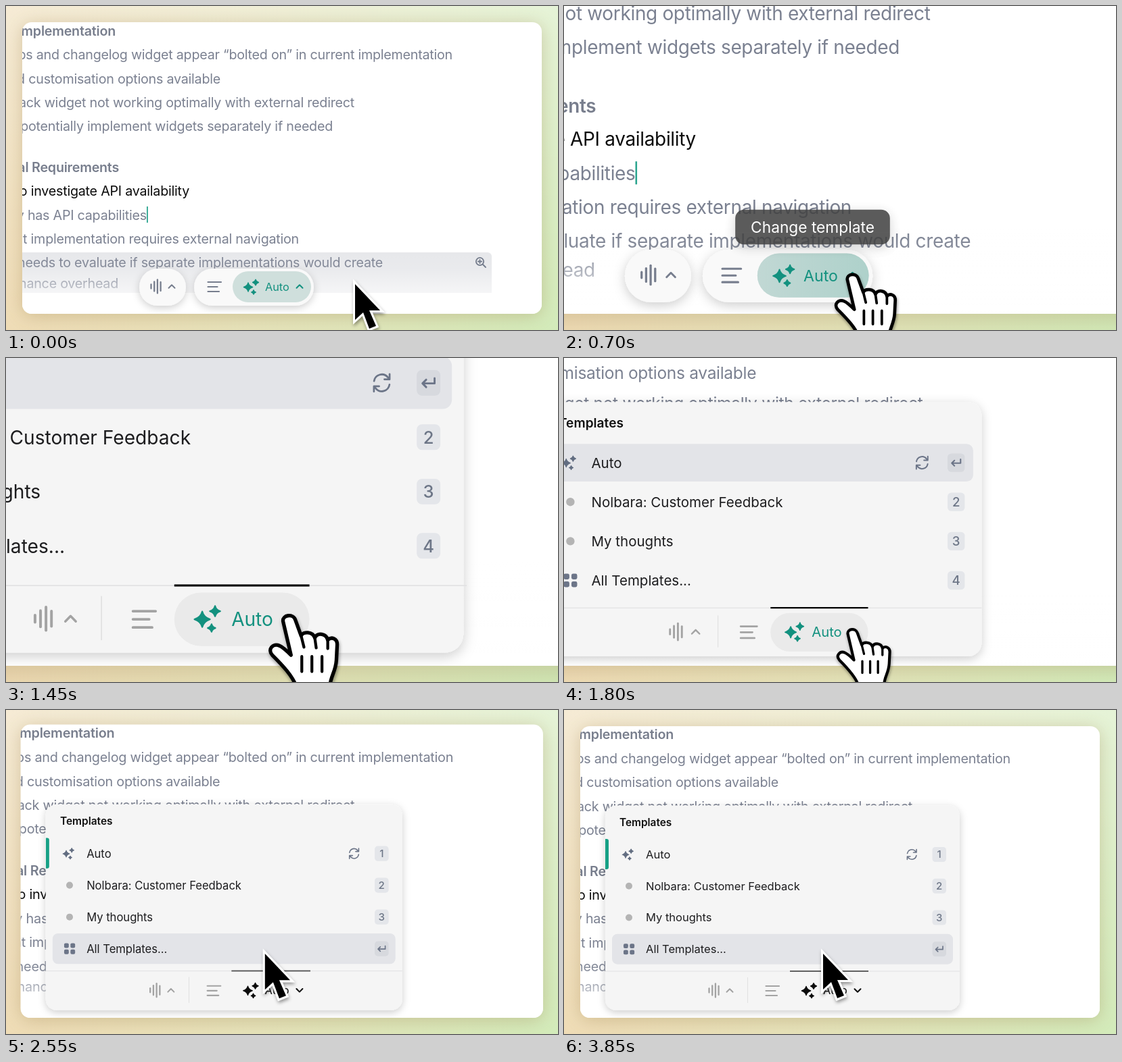
Recreate the animation shown at these times as an HTML page. Size 816 by 480 pixels, loop 3900 ms.

```html
<!DOCTYPE html>
<html lang="en">
<head>
<meta charset="utf-8">
<title>Template picker</title>
<style>
  html, body { margin: 0; width: 100%; height: 100%; overflow: hidden; background: #e9e6c4; }
  svg { display: block; width: 816px; height: 480px; font-family: Inter, "Open Sans", sans-serif; }
  .note { font-size: 19.7px; letter-spacing: -.012em; text-anchor: end; fill: #7b8191; }
  .head { font-weight: 600; fill: #787e8d; }
  .own { fill: #0c0c0c; }
  .item { font-size: 16.5px; fill: #1d1d1f; }
  .label { font-size: 16.3px; }
  .key { font-size: 15px; font-weight: 500; text-anchor: middle; fill: #6d7687; }
  .line { fill: none; stroke-linecap: round; stroke-linejoin: round; }
</style>
</head>
<body>
<svg viewBox="0 0 816 480">
  <defs>
    <linearGradient id="bgAcross">
      <stop offset="0" stop-color="#efdcb6"/><stop offset=".45" stop-color="#e6e3ba"/><stop offset="1" stop-color="#d3ebba"/>
    </linearGradient>
    <linearGradient id="bgDown" x2="0" y2="1">
      <stop offset="0" stop-color="#fff" stop-opacity=".42"/><stop offset="1" stop-color="#fff" stop-opacity="0"/>
    </linearGradient>
    <linearGradient id="fadeDown" x2="0" y2="1">
      <stop offset="0" stop-color="#fff" stop-opacity="0"/><stop offset=".25" stop-color="#fff" stop-opacity=".1"/>
      <stop offset="1" stop-color="#fff"/>
    </linearGradient>
    <linearGradient id="pillHover">
      <stop offset="0" stop-color="#bfd7d3"/><stop offset="1" stop-color="#a9cfc8"/>
    </linearGradient>
    <filter id="soft" x="-20%" y="-20%" width="140%" height="140%"><feGaussianBlur stdDeviation="13"/></filter>
    <filter id="lift" x="-30%" y="-40%" width="160%" height="200%">
      <feDropShadow dx="0" dy="3" stdDeviation="6" flood-color="#000" flood-opacity=".2"/>
    </filter>
    <filter id="tiny" x="-30%" y="-30%" width="170%" height="170%">
      <feDropShadow dx="1" dy="3" stdDeviation="2.5" flood-color="#000" flood-opacity=".4"/>
    </filter>
    <clipPath id="cardClip"><rect x="24" y="24" width="768" height="432" rx="14"/></clipPath>
    <clipPath id="menuClip"><rect class="box" x="61" rx="16"/></clipPath>
  </defs>
  <rect width="816" height="480" fill="url(#bgAcross)"/>
  <rect width="816" height="480" fill="url(#bgDown)"/>
  <g id="camera">
    <rect x="24" y="27" width="768" height="432" rx="14" fill="#8a6a30" opacity=".3" filter="url(#soft)"/>
    <rect x="24" y="24" width="768" height="432" rx="14" fill="#fff"/>
    <g clip-path="url(#cardClip)"><g id="content">
      <g id="rowHover">
        <path d="M0 365H712a6 6 0 0 1 6 6V425H0Z" fill="#e7e8eb"/>
      </g>
      <g id="notes"></g>
      <rect x="24" y="366" width="768" height="90" fill="url(#fadeDown)"/>
      <g id="zoomIcon" class="line" stroke="#737b8b" stroke-width="1.8">
        <circle cx="700.5" cy="378.5" r="5.6"/><path d="M705 383l4 4M697.8 378.5h5.4M700.5 375.8v5.4"/>
      </g>
      <g id="toolbar"></g>
      <g id="tip">
        <rect x="312" y="347.3" width="161" height="36.4" rx="9" fill="#424242" filter="url(#lift)"/>
        <text x="392.5" y="371.8" font-size="16" text-anchor="middle" fill="#fff">Change template</text>
      </g>
      <g id="menu">
        <rect class="box" x="61" rx="16" fill="#f5f5f5" filter="url(#lift)"/>
        <g clip-path="url(#menuClip)"><g id="list"></g></g>
        <g id="footer"></g>
      </g>
    </g></g>
    <g id="cursor"></g>
  </g>
</svg>
<script>
const LOOP = 3900, HOVER = 430, CLICK = 1100, OPEN = 1180, LEAVE = 1950, PICK = 2300;
const TEAL = '#13917f', SLATE = '#6c7588';
const $ = id => document.getElementById(id);

// Small drawing helpers
const line = (d, color, w = 2.2) => `<path class="line" d="${d}" stroke="${color}" stroke-width="${w}"/>`;
const box = (x, y, w, h, r, fill, extra = '') =>
  `<rect x="${x}" y="${y}" width="${w}" height="${h}" rx="${r}" fill="${fill}" ${extra}/>`;
const star = (x, y, r) => {
  const k = r * .26;
  return `M${x} ${y - r}Q${x + k * .7} ${y - k} ${x + r} ${y}Q${x + k * .7} ${y + k} ${x} ${y + r}` +
    `Q${x - k * .7} ${y + k} ${x - r} ${y}Q${x - k * .7} ${y - k} ${x} ${y - r}Z`;
};
const sparkles = (x, y, size, color) =>
  `<path transform="translate(${x} ${y}) scale(${size})" fill="${color}" stroke="${color}" stroke-width="1.4"
    stroke-linejoin="round" d="${star(-4, .5, 6.6)}${star(7, -6.5, 4.4)}${star(4, 8, 3.2)}"/>`;
const chevron = (x, y, dir, color) => line(`M${x - 4.5} ${y + 2.3 * dir}l4.5 ${-4.6 * dir}l4.5 ${4.6 * dir}`, color, 2);
const wave = color => [6, 14, 20, 13].map((h, i) =>
  line(`M${214.5 + i * 4.7} ${415.5 - h / 2}v${h}`, color, 2.3)).join('');
const menuLines = color => line('M298.5 409h19.5M298.5 416h14M298.5 423h16.5', color);

// Notes: text, right end, middle, class
$('notes').innerHTML = [
  ['Current Implementation', 162, 36.5, 'head'],
  ['Roadmaps and changelog widget appear “bolted on” in current implementation', 660, 72],
  ['Limited customisation options available', 317, 107.5],
  ['Feedback widget not working optimally with external redirect', 515, 143],
  ['Could potentially implement widgets separately if needed', 483, 178],
  ['Technical Requirements', 167, 239, 'head'],
  ['Need to investigate API availability', 271, 274, 'own'],
  ['Currently has API capabilities', 208, 309.5],
  ['Current implementation requires external navigation', 433, 345],
  ['Team needs to evaluate if separate implementations would create', 557, 380],
  ['maintenance overhead', 166, 410.5]
].map(([s, x, y, c = '']) => `<text class="note ${c}" x="${x}" y="${y + 7}">${s}</text>`).join('') +
  box(208, 297, 1.8, 24, 0, '#2ba58f');

$('toolbar').innerHTML =
  box(197, 389, 69, 55, 27.5, '#f9f9f9', 'filter="url(#lift)"') +
  box(278, 389, 177, 55, 27.5, '#f9f9f9', 'filter="url(#lift)"') +
  box(335, 393, 116, 46, 23, '#cfdfdc') +
  box(335, 393, 116, 46, 23, 'url(#pillHover)', 'id="pill"') +
  wave('#777e8e') + chevron(245, 415.5, 1, '#777e8e') + menuLines('#777e8e') +
  sparkles(362, 416, 1, TEAL) + `<text class="label" x="383" y="422" fill="${TEAL}">Auto</text>` +
  chevron(434, 415.5, 1, TEAL);

// Menu list
const rowY = [214, 260.7, 307.5, 354.2];
const names = ['Auto', 'Nolbara: Customer Feedback', 'My thoughts', 'All Templates...'];
const enter = y => line(`M560 ${y - 4}v4.5h-10.5m3.2 -3.2l-3.2 3.2l3.2 3.2`, SLATE, 1.7);
const dot = y => `<circle cx="96" cy="${y}" r="5" fill="#b4b4b4"/>`;
const grid = y => [88, 97.3].map(x => [y - 8, y + 1.2].map(v => box(x, v, 6.8, 6.8, 2, SLATE)).join('')).join('');
const icons = [y => sparkles(94, y, .74, '#626d81'), dot, dot, grid];

$('list').innerHTML =
  '<text x="82" y="171.7" font-size="15.4" font-weight="600" fill="#111">Templates</text>' +
  `<path d="M61 191h2a3 3 0 0 1 3 3v39a3 3 0 0 1 -3 3h-2Z" fill="#16a085"/>` +
  rowY.map((y, i) =>
    `<g class="hot">${box(71, y - 22.5, 504, 45, 8, '#e3e4e8')}</g>` + icons[i](y) +
    `<text class="item" x="121" y="${y + 6}">${names[i]}</text>` +
    box(544.5, y - 11, 20.5, 22, 4.5, '#e4e6ea') +
    `<text class="key" x="554.7" y="${y + 5.4}">${i + 1}</text>` +
    `<g class="hot">${box(544.5, y - 11, 20.5, 22, 4.5, '#d7d9de')}${enter(y)}</g>`).join('') +
  line('M507.5 212.5a6.8 6.8 0 0 1 12 -3.2l1.5 1.7m0 -4.5v4.5h-4.5' +
    'M520.9 215.5a6.8 6.8 0 0 1 -12 3.2l-1.5 -1.7m0 4.5v-4.5h4.5', SLATE, 1.6);
const hot = [...document.querySelectorAll('.hot')];

const autoLabel = (id, color, chev) => `<g id="${id}">` + sparkles(362, 415.5, 1, color) +
  `<text class="label" x="383" y="421.5" fill="${color}">Auto</text>` + chev + '</g>';
$('footer').innerHTML =
  box(61, 386.5, 524, 1, 0, '#e2e2e3') + box(271, 396, 1, 38, 0, '#e1e1e1') +
  wave('#a3a3a3') + chevron(245, 415.5, 1, '#a3a3a3') + menuLines('#a3a3a3') +
  box(334, 393, 116, 46, 23, '#eaeaea', 'id="grayPill"') +
  autoLabel('autoOn', TEAL, chevron(434, 415.5, 1, TEAL)) +
  autoLabel('autoOff', '#0c0c0c', chevron(434, 415.5, -1, '#0c0c0c')) +
  box(334, 386, 116, 1.8, 0, '#000', 'id="accent"');

$('cursor').innerHTML =
  `<g id="arrow" filter="url(#tiny)"><path d="M0 0V53L12 42L21 66L31 62L21 39H37Z" fill="#000"
    stroke="#fff" stroke-width="6" paint-order="stroke" stroke-linejoin="miter"/></g>
  <g id="hand" filter="url(#tiny)" transform="scale(.665)"><path d="M-8 8C-9 -1 6 -3 9 6L17 28C20 22 33 22 36 31
    C40 23 52 25 54 34C59 29 68 32 67 42L66 62C65 78 58 84 57 98H10C5 84 -8 70 -23 55C-30 47 -22 38 -13 42
    C-8 44 -2 50 3 55Z" fill="#fff" stroke="#000" stroke-width="5" stroke-linejoin="round"/>
    <path class="line" d="M18 57V78M32 57V78M46 57V78" stroke="#000" stroke-width="4"/>
    <path class="line" d="M17 28L21 44M36 31L38 45M54 34V46" stroke="#000" stroke-width="4"/></g>`;

// Motion
const ramp = (t, a, b) => Math.min(1, Math.max(0, (t - a) / (b - a)));
const smooth = (t, a, b) => { const p = ramp(t, a, b); return p * p * (3 - 2 * p); };

// Critically damped spring: progress and speed per second
function spring(t, start, w) {
  const x = Math.max(0, t - start) / 1000 * w, e = Math.exp(-x);
  return [1 - (1 + x) * e, w * x * e];
}

// Monotone cubic track through [time, value] points
function track(pts) {
  const sec = pts.slice(1).map((p, i) => (p[1] - pts[i][1]) / (p[0] - pts[i][0]));
  const tan = pts.map((_, i) => {
    const a = sec[i - 1] || 0, b = sec[i] || 0;
    return a * b > 0 ? 2 * a * b / (a + b) : 0;
  });
  return t => {
    let i = 0;
    while (i < pts.length - 2 && t >= pts[i + 1][0]) i++;
    const h = pts[i + 1][0] - pts[i][0], u = (t - pts[i][0]) / h, v = 1 - u;
    return pts[i][1] * (1 + 2 * u) * v * v + pts[i + 1][1] * u * u * (3 - 2 * u) +
      h * (tan[i] * u * v * v - tan[i + 1] * u * u * v);
  };
}
const path = [
  [0, 516, 412], [100, 516, 412], [650, 434.3, 415], [1100, 432.6, 412.9], [1750, 432, 412.6],
  [2100, 412, 411], [2520, 383.2, 361.5], [LOOP, 383, 361]
];
const curX = track(path.map(p => [p[0], p[1]])), curY = track(path.map(p => [p[0], p[2]]));
const press = track([[0, 1], [960, 1], [CLICK, .883], [1200, .87], [1450, .93], [1750, 1], [LOOP, 1]]);

const show = (id, o) => { $(id).style.opacity = o; };

function render(t) {
  const [zin, vin] = spring(t, 450, 7.7), [zout, vout] = spring(t, 1432, 6.2);
  const s = 1 + .73 * (zin - zout), speed = .73 * Math.abs(vin - vout);
  $('camera').setAttribute('transform', `translate(452 456) scale(${s}) translate(-452 -456)`);
  $('content').style.filter = speed > .4 ? `blur(${.35 * speed}px)` : 'none';

  show('rowHover', t < HOVER ? 1 : 0);
  show('zoomIcon', t < HOVER ? 1 : 0);
  show('pill', smooth(t, HOVER, 780));
  show('tip', smooth(t, 570, 740) * (1 - ramp(t, 1150, 1220)));

  // Panel grows out of the toolbar and settles
  const u = Math.max(0, t - OPEN) / 1000, d = Math.exp(-10 * u) * Math.cos(12 * u);
  const open = ramp(t, OPEN, OPEN + 70), top = 141.5 + 220 * Math.max(0, d), sx = 1 - .15 * Math.abs(d);
  show('menu', open);
  show('toolbar', 1 - open);
  document.querySelectorAll('.box').forEach(b => {
    b.setAttribute('y', top);
    b.setAttribute('height', 444.7 - top);
    b.setAttribute('width', 300 + 285 * sx - 61 - 1 + sx);
  });
  $('list').setAttribute('transform', `translate(${300 * (1 - sx)} ${21 * d}) scale(${sx} 1)`);
  const row = t < PICK ? 0 : 3;
  hot.forEach((g, i) => { g.style.opacity = (i >> 1) === row ? 1 : 0; });
  const keys = document.querySelectorAll('.key');
  keys.forEach((k, i) => { k.style.opacity = i === row ? 0 : 1; });

  const left = ramp(t, LEAVE, LEAVE + 100);
  show('grayPill', 1 - left);
  show('autoOn', 1 - left);
  show('autoOff', left);
  show('accent', 1 - .35 * ramp(t, LEAVE, 2200));

  const isHand = t >= HOVER && t < LEAVE;
  show('hand', isHand ? 1 : 0);
  show('arrow', isHand ? 0 : 1);
  $('cursor').setAttribute('transform', `translate(${curX(t)} ${curY(t)}) scale(${press(t)})`);
}

const began = performance.now();
function tick() {
  render((performance.now() - began) % LOOP);
  requestAnimationFrame(tick);
}
render(0);
requestAnimationFrame(tick);
</script>
</body>
</html>
```
